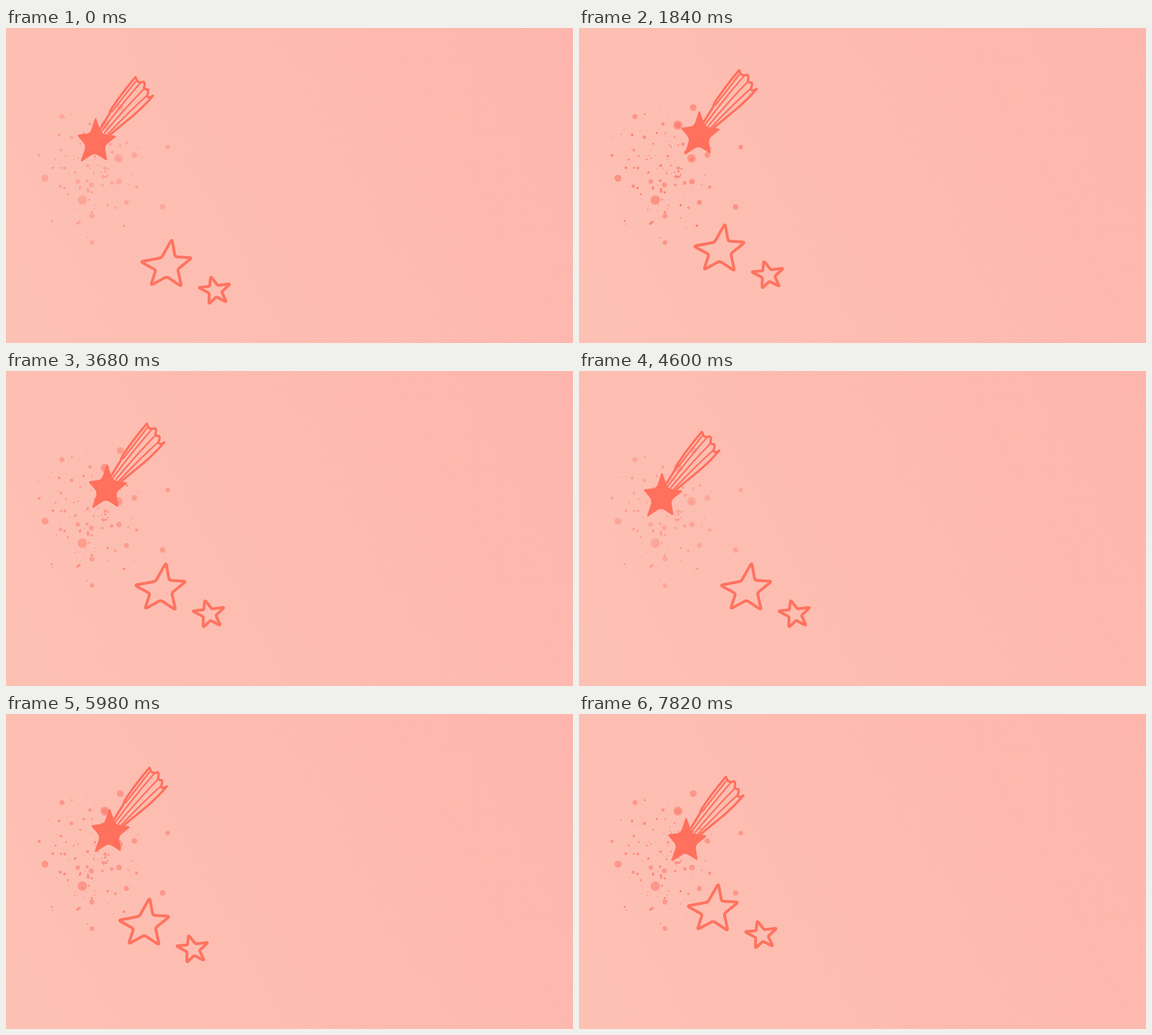
These frames come from a looping animation (1003x558 px, 8000 ms). An HTML page:

```html
<!DOCTYPE html>
<html lang="en">
<head>
<meta charset="utf-8">
<title>Shooting star</title>
<style>
html, body { margin: 0; width: 100%; height: 100%; overflow: hidden; background: #fdbcb1; }
svg { display: block; width: 100vw; height: 100vh; }
</style>
</head>
<body>
<svg viewBox="0 0 1003 558" preserveAspectRatio="none">
  <defs>
    <linearGradient id="bg" gradientUnits="userSpaceOnUse" x1="0" y1="558" x2="1003" y2="0">
      <stop offset="0" stop-color="#fdc1b4"/>
      <stop offset="1" stop-color="#feb6ac"/>
    </linearGradient>
  </defs>
  <rect width="1003" height="558" fill="url(#bg)"/>
  <g id="comet" fill="none" stroke="#ff705d" stroke-linecap="round" stroke-linejoin="round">
    <path id="body" fill="#ff705d" stroke-width="2"/>
    <path stroke-width="4" d="M165 181L183 152Q184 146 190 138Q206 114 229 87L232 94Q238 98 243 95Q247 97 244 106Q247 110 251 109Q253 113 249 121Q254 125 260 120Q244 139 224 156L184 189"/>
    <path id="strands" stroke-width="2.8"/>
  </g>
  <g id="pair" fill="none" stroke="#ff735f" stroke-width="5" stroke-linejoin="round">
    <path id="big"/>
    <path id="small"/>
  </g>
  <g id="spray" fill="#fb705f"></g>
</svg>
<script>
const $ = id => document.getElementById(id);
const LOOP = 8000, STEP = 230, LEG = 2300;

const mix = (a, b, k) => [a[0] + (b[0] - a[0]) * k, a[1] + (b[1] - a[1]) * k];

// Hand-drawn star from its five tips; notches are pulled toward the centre
function star(tips, depth, tipR, notchR) {
  const mid = [0, 1].map(j => tips.reduce((s, p) => s + p[j], 0) / tips.length);
  const pts = tips.flatMap((p, i) =>
    [p, mix(mid, mix(p, tips[(i + 1) % tips.length], 0.5), depth)]);
  const toward = (a, b, r) =>
    mix(a, b, Math.min(0.45, r / Math.hypot(b[0] - a[0], b[1] - a[1])));
  return pts.map((p, i) => {
    const r = i % 2 ? notchR : tipR;
    const from = toward(p, pts.at(i - 1), r);
    const to = toward(p, pts[(i + 1) % pts.length], r);
    return `${i ? 'L' : 'M'}${from}Q${p} ${to}`;
  }).join('') + 'Z';
}

const shapes = {
  body: star([[158.5, 160], [194, 192], [178, 234], [133, 236], [127, 190]], 0.55, 2, 8),
  big: star([[293.5, 374], [329, 407], [310.5, 458], [256, 456], [238, 414]], 0.53, 5, 4),
  small: star([[362, 440], [397, 453], [390, 485.5], [359, 489], [340, 459.5]], 0.5, 4, 2),
  // tail strands fan out from the star to the ragged end
  strands: 'M187 149L229 95' + [0, 0.5, 1].map(k => {
    const a = mix([169, 183], [180, 188], k), b = mix([237, 98], [250, 119], k);
    const [x, y] = mix(a, b, 0.55);
    return `M${a}Q${x - 2} ${y - 1} ${b}`;
  }).join('')
};
for (const id in shapes) $(id).setAttribute('d', shapes[id]);

function seeded(s) {
  return () => {
    s = (s * 1664525 + 1013904223) % 4294967296;
    return s / 4294967296;
  };
}

// A few large drops, then a cloud of specks that is densest in the middle
function spray() {
  const rnd = seeded(17);
  const bell = () => (rnd() + rnd() + rnd() + rnd() - 2) / 2;
  const dot = (x, y, r, alpha) => `<circle cx="${x}" cy="${y}" r="${r}" opacity="${alpha}"/>`;
  const drops = [
    [135, 305, 8.5], [175, 172, 8], [199, 231, 7.5], [69, 266, 6.3], [202, 141, 6],
    [227, 225, 5], [200, 272, 5], [277, 317, 5], [99, 157, 4.5], [213, 309, 4.5],
    [151, 278, 4.5], [152, 333, 4.5], [286, 211, 4], [152, 380, 4], [127, 272, 4]];
  let s = drops.map(([x, y, r]) => dot(x, y, r, 0.6)).join('') + dot(175, 172, 5, 0.6);
  for (let i = 0; i < 110; i++) {
    const x = 150 + 135 * bell(), y = 255 + 165 * bell();
    const r = 0.8 + 2.4 * rnd() ** 3;
    s += dot(x.toFixed(1), y.toFixed(1), r.toFixed(2), r > 2.4 ? 0.65 : 0.9);
  }
  return s;
}
$('spray').innerHTML = spray();

// Offsets at each turn; straight travel between them
const cometStops = [[0, 0], [68, -15.5], [-11.8, 20.8], [49, -0.4], [4, 61]];
const pairStops = [[0, 0], [-44, -34.5], [12, -34.5], [-73.5, -58], [-7, -97.5]];

function along(stops, t) {
  const i = Math.floor(t / LEG);
  return `translate(${mix(stops[i], stops[i + 1], t / LEG - i)})`;
}

function draw(now) {
  const t = Math.floor((now % LOOP) / STEP) * STEP;
  $('comet').setAttribute('transform', along(cometStops, t));
  $('pair').setAttribute('transform', along(pairStops, t));
  const swing = 1 - Math.abs((t / LEG) % 2 - 1);
  $('spray').setAttribute('opacity', 0.5 + 0.5 * swing);
}

function tick() {
  draw(performance.now());
  requestAnimationFrame(tick);
}
tick();
</script>
</body>
</html>
```
